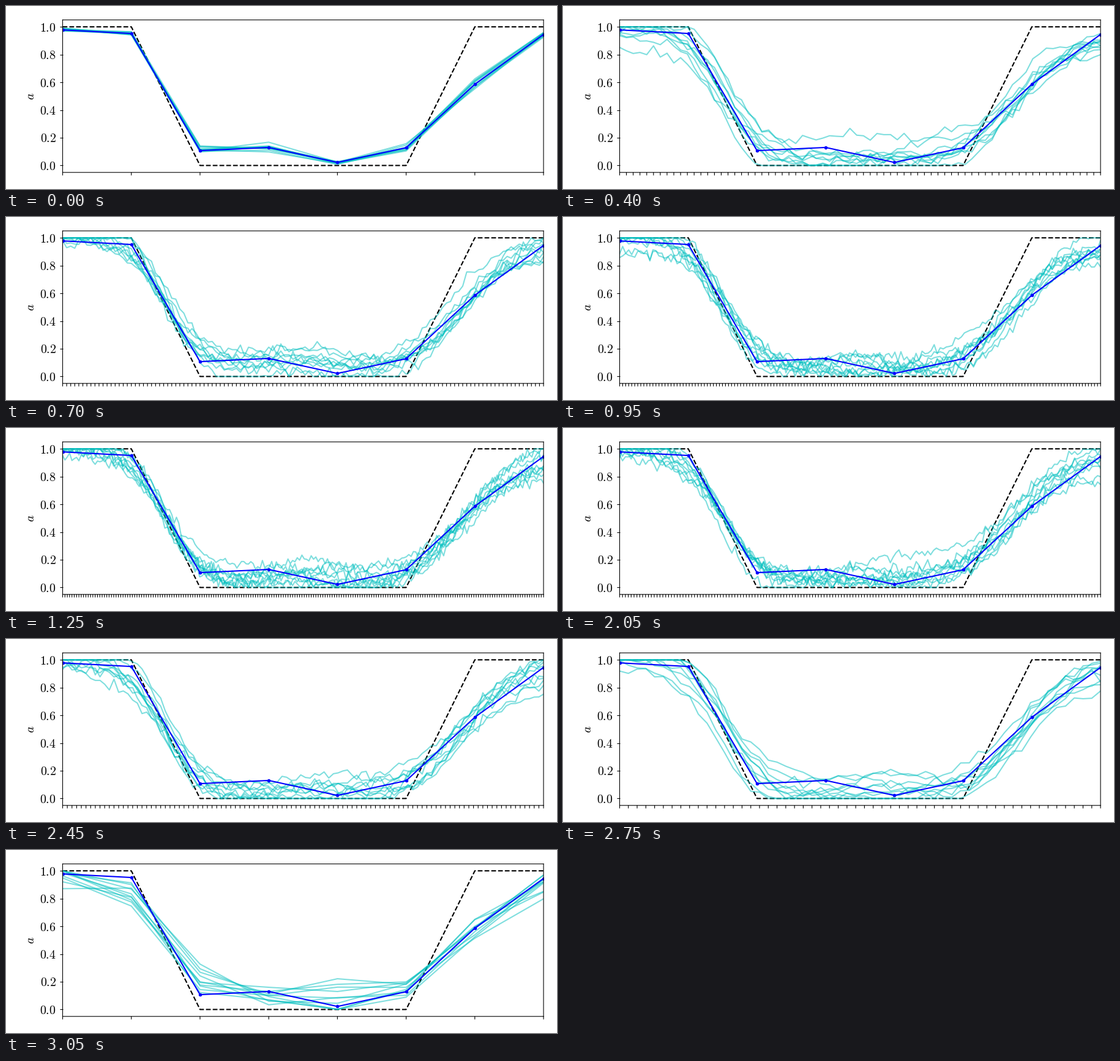
These frames come from a looping animation (900x300 px, 3.1 s). A matplotlib script:

```python
import numpy as np
import matplotlib.pyplot as plt
from matplotlib.animation import FuncAnimation

W, H, DPI = 900, 300, 100
FRAMES, INTERVAL = 62, 50
KNOTS, SAMPLES = 8, 10
LEFT, RIGHT, TOP, BOTTOM = 92.5, 878, 22.8, 272.8
TICK = 3.5 * DPI / 72 / (BOTTOM - TOP)

plt.rcParams["mathtext.fontset"] = "cm"

STEP = [1, 1, 0, 0, 0, 0, 1, 1]
MEAN = np.array([.978, .952, .107, .13, .022, .128, .586, .945])


def sigmoid(x):
    return 1 / (1 + np.exp(-x))


def grid(i):
    """The grid gets finer by one set of knots per frame, then coarser again."""
    return np.linspace(0, KNOTS - 1, KNOTS * min(i + 1, FRAMES - i))


def trend(x):
    """A steep fall, a flat valley with a slight hump and a softer rise."""
    fall = sigmoid(3.4 * (1.5 - x))
    rise = .93 * sigmoid(2.4 * (x - 5.8))
    return .02 + fall + rise + .05 * np.exp(-(x - 3.4) ** 2)


def wander(x, rng):
    """Smooth random deviation built from a few slow cosines."""
    k = np.arange(7)
    amp = .045 * rng.normal(size=7) / (1 + .25 * k)
    phase = rng.uniform(0, 2 * np.pi, 7)
    return np.cos(np.outer(x, k) * np.pi / 7 + phase) @ amp


def sample(i, x, rng):
    if i == 0:
        spread = .05 * np.sqrt(MEAN * (1 - MEAN))
        y = MEAN + spread * rng.normal(size=KNOTS)
    else:
        y = trend(x) + wander(x, rng) + rng.normal(0, .02, len(x))
    return np.clip(y, 0, 1)


fig = plt.figure(figsize=(W / DPI, H / DPI), dpi=DPI, facecolor="white")
ax = fig.add_axes([LEFT / W, 1 - BOTTOM / H, (RIGHT - LEFT) / W, (BOTTOM - TOP) / H])
ax.set_xlim(0, KNOTS - 1)
ax.set_ylim(-.05, 1.05)
ax.set_xticks([])
levels = np.arange(6) / 5
ax.set_yticks(levels, [f"${v:.1f}$" for v in levels], fontsize=14.4)
ax.tick_params(axis="y", pad=4)
for spine in ax.spines.values():
    spine.set_snap(False)
fig.text(50.5 / W, 1 - 148 / H, "$a$", fontsize=14.4, rotation=90,
         ha="right", va="center")

knots = np.arange(KNOTS)
ax.plot(knots, STEP, "k--", lw=1.5)
curves = [ax.plot([], [], color="c", alpha=.5, lw=1.5)[0] for _ in range(SAMPLES)]
ax.plot(knots, MEAN, "b.-", lw=1.5, ms=6)
ticks, = ax.plot([], [], "k", lw=.8, solid_capstyle="butt", snap=False,
                 transform=ax.get_xaxis_transform(), clip_on=False)


def update(i):
    x = grid(i)
    rng = np.random.default_rng(100 + i)
    for line in curves:
        line.set_data(x, sample(i, x, rng))
    ticks.set_data(np.repeat(x, 3), np.tile([0, -TICK, np.nan], len(x)))
    return [*curves, ticks]


anim = FuncAnimation(fig, update, frames=FRAMES, interval=INTERVAL,
                     repeat=True, repeat_delay=0, blit=False)
plt.show()
```
